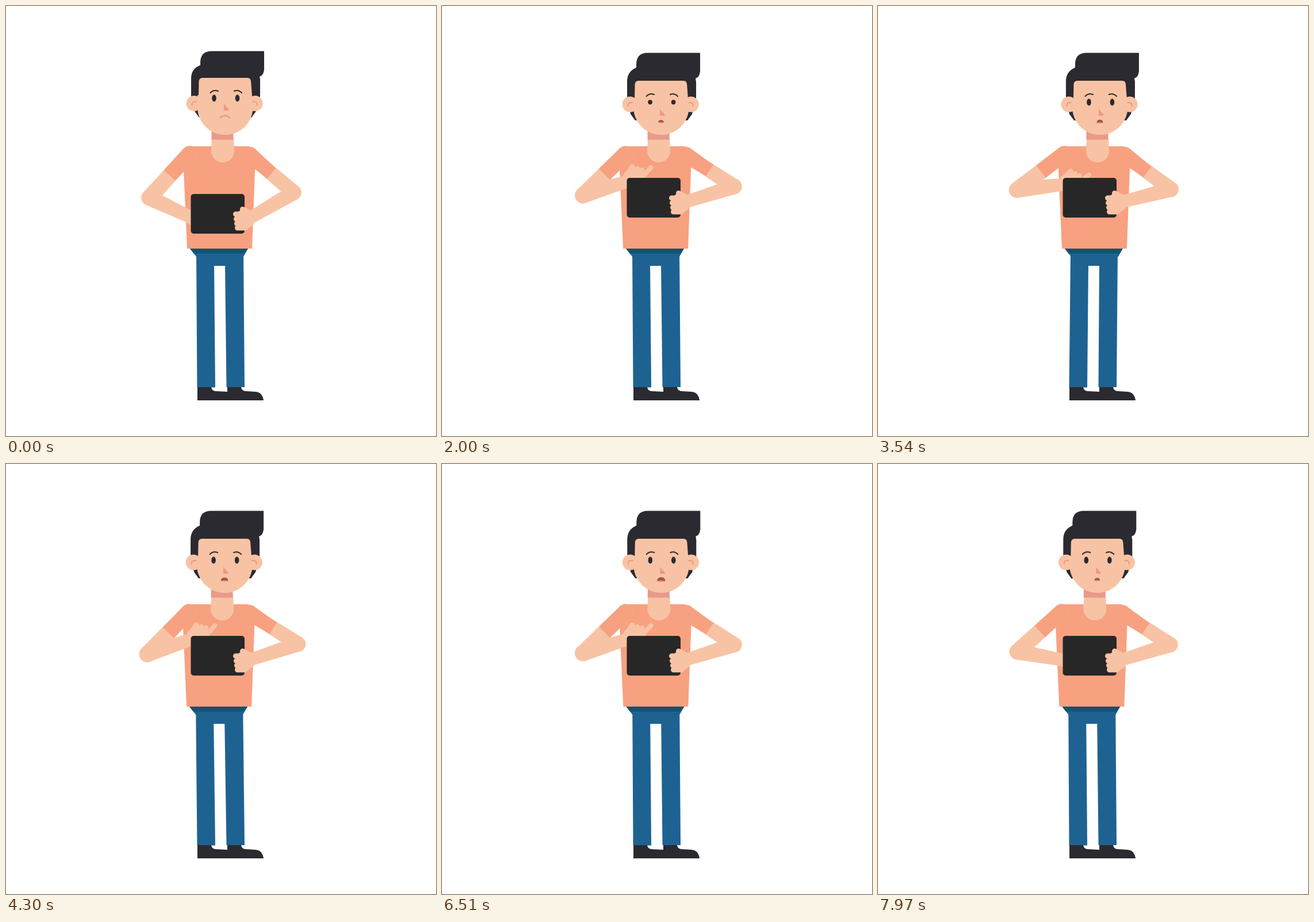
These frames come from a looping animation (748 by 748 pixels, 8 s). An HTML page with a canvas:

```html
<!DOCTYPE html>
<html lang="en">
<head>
<meta charset="utf-8">
<title>Man with tablet</title>
<style>
  html, body { margin: 0; width: 100%; height: 100%; overflow: hidden; background: #fff; }
  canvas { display: block; width: 100vmin; height: 100vmin; }
</style>
</head>
<body>
<canvas id="stage" width="748" height="748"></canvas>
<script>
const ctx = document.getElementById('stage').getContext('2d');
const LOOP = 8000;
const SKIN = '#f8c3a4', SHADE = '#e99a8a', SHIRT = '#f7a180', DARK = '#2b2a30';
const JEANS = '#1e6292', BELT = '#17526d', TABLET = '#272727';

const clamp = v => Math.max(0, Math.min(1, v));
const ease = (t, from, to) => {
  const p = clamp((t - from) / (to - from));
  return p * p * (3 - 2 * p);
};
const bump = (t, from, to) => Math.sin(Math.PI * clamp((t - from) / (to - from)));

function fill(color, d) {
  ctx.fillStyle = color;
  ctx.fill(new Path2D(d));
}

function stroke(color, width, d) {
  ctx.strokeStyle = color;
  ctx.lineWidth = width;
  ctx.lineCap = 'round';
  ctx.stroke(new Path2D(d));
}

function oval(color, x, y, rx, ry = rx) {
  ctx.fillStyle = color;
  ctx.beginPath();
  ctx.ellipse(x, y, rx, ry, 0, 0, Math.PI * 2);
  ctx.fill();
}

// Tapered limb from a to b with half widths ra and rb
function limb(color, a, b, ra, rb, roundEnd) {
  const len = Math.hypot(b.x - a.x, b.y - a.y);
  const nx = -(b.y - a.y) / len, ny = (b.x - a.x) / len;
  fill(color, `M${a.x + nx * ra} ${a.y + ny * ra}L${b.x + nx * rb} ${b.y + ny * rb}
    L${b.x - nx * rb} ${b.y - ny * rb}L${a.x - nx * ra} ${a.y - ny * ra}Z`);
  oval(color, a.x, a.y, ra);
  if (roundEnd) oval(color, b.x, b.y, rb);
}

// Two-bone joint position
function elbow(s, h, upper, lower, side) {
  const dx = h.x - s.x, dy = h.y - s.y, d = Math.hypot(dx, dy);
  const a = (upper * upper - lower * lower + d * d) / (2 * d);
  const b = side * Math.sqrt(Math.max(0, upper * upper - a * a));
  return { x: s.x + (a * dx - b * dy) / d, y: s.y + (a * dy + b * dx) / d };
}

function arm(s, h, o) {
  const e = elbow(s, h, o.upper, o.lower, o.side);
  const k = o.sleeve / o.upper;
  const cut = { x: s.x + (e.x - s.x) * k, y: s.y + (e.y - s.y) * k };
  limb(SKIN, s, e, o.width, o.joint, true);
  limb(SKIN, e, h, o.joint, 10.8, true);
  limb(SHIRT, s, cut, o.cap, o.width, false);
}

const LEFT = { upper: 103.4, lower: 84, side: 1, sleeve: 51, width: 13.5, joint: 14, cap: 13.5 };
const RIGHT = { upper: 100.6, lower: 87.4, side: -1, sleeve: 49.6, width: 11.7, joint: 13.3, cap: 14 };

function legs(dx) {
  const s = dx * 0.8;
  fill(JEANS, `M${331 + s} 432L${413 + s} 432L415 663L383.5 663L${381 + s} 452
    L${362 + s} 452L364 663.5L332.5 663.5Z`);
  fill(DARK, 'M333 663H357Q358 670 365 670L385 671V663H409Q410 670 417 670L434 671Q446 672 448 686H333Z');
}

function torso() {
  fill(JEANS, 'M320 422H421L413 436H331Z');
  fill(BELT, 'M320 422H421L414.5 430.5H326.5Z');
  fill(SHIRT, 'M318 244H422Q432 247 433.5 262L433 286L428 422H315L309 286L308 262Z');
}

function neck() {
  fill(SKIN, 'M358 230H396L397 252A20 20 0 0 1 357 252Z');
  fill(SHADE, 'M357.5 215H395.5V232.5H357.5Z');
}

function mouth(t, y) {
  if (t < 1400) {
    stroke(SHADE, 2.4, `M372 ${194.5 + y}Q380.5 ${187 + y} 389 ${194.5 + y}`);
    return;
  }
  const w = 6.6 - 1.7 * Math.cos((t - 2000) * 2 * Math.PI / 542.7);
  const h = w * 0.56, cy = 200.8;
  const shape = `M${381 - w} ${cy + h * .75}Q${381 - w} ${cy - h} 381 ${cy - h}
    Q${381 + w} ${cy - h} ${381 + w} ${cy + h * .75}Q381 ${cy + h * 1.15} ${381 - w} ${cy + h * .75}Z`;
  ctx.save();
  ctx.clip(new Path2D(shape));
  fill('#a5544a', shape);
  oval('#e5827a', 381, cy + h * 1.15, w * .85, h * .8);
  ctx.restore();
}

function head(t, k) {
  const y = 5 * k, top = 78.5 + 3 * k, ear = 169.5 + 1.6 * k, f = 7 * k;
  fill(DARK, `M322 ${157 + y}V${126 + y}Q322 ${109 + y} 338 ${103 + 4 * k}V${top + 20}
    Q338 ${top} 358 ${top}H449V${top + 32}Q448 ${121 + 3 * k} 441 ${123 + 3 * k}
    L442 ${127 + y}V${157 + y}L435 ${183 + y}L427 ${194 + y}H336L328 ${183 + y}Z`);
  fill(SKIN, `M335 ${155 + y}L335.5 ${131 + y}Q336 ${125 + y} 342 ${125 + y}H420
    Q425.5 ${125 + y} 426 ${131 + y}L428 ${157 + y}H429.5V178A48.3 48.3 0 0 1 333 178V${155 + y}Z`);
  oval(SKIN, 327, ear, 13.5);
  oval(SKIN, 433.2, ear, 13.5);
  stroke(SHADE, 2, `M323.5 ${ear + 3}Q323 ${ear - 4} 331 ${ear - 3}`);
  stroke(SHADE, 2, `M436.5 ${ear + 3}Q437 ${ear - 4} 429 ${ear - 3}`);

  const open = 1 - 0.8 * bump(t, 1930, 2230) ** 2;
  for (const x of [362, 402.5]) oval(DARK, x, 160.3 + f, 3.8, 0.6 + 5.5 * open);
  stroke(DARK, 2.1, `M355.5 ${151 + 6 * k}Q361 ${145 + 6 * k} 369 ${148 + 6 * k}`);
  stroke(DARK, 2.1, `M397 ${148 + 6 * k}Q404 ${145 + 6 * k} 410 ${151 + 6 * k}`);
  const n = 9 * k;
  fill('#ee978a', `M379 ${170 + n}L387.5 ${180 + n}Q388 ${182 + n} 386 ${182 + n}H379Z`);
  mouth(t, 7.5 * k);
}

// Pointing hand, drawn around its wrist
function pointingHand(h, angle) {
  ctx.save();
  ctx.translate(h.x, h.y);
  ctx.rotate(angle);
  ctx.translate(-325.3, -304);
  fill(SKIN, 'M313 303L316 292L329 279L344 283L354 291L352 310L325 316Z');
  stroke(SKIN, 9, 'M331 280L321 296M340 283.5L335 296');
  stroke(SKIN, 8, 'M348 285L343 298M363.5 281L347 299');
  ctx.restore();
}

function grip() {
  fill(SKIN, 'M403 331L412 323L430 331L431 352L418 361L403 361Z');
  stroke(SKIN, 9, 'M411.5 325.5L424 332M399.5 334H414M400.5 342.5H414M401.5 350.5H414M402.5 358H416');
}

function draw(t) {
  const dx = 2.75 - 3.7 * Math.cos((t - 240) * Math.PI / 1000);
  const lift = ease(t, 60, 880);
  const low = 28 * (1 - lift);
  const taps = Math.sin(Math.PI * clamp((t - 2300) / 1650) * 2) ** 2;
  const raise = (ease(t, 1130, 1930) - ease(t, 7050, 7950)) * (1 - 0.16 * taps);
  const hand = { x: 325.3, y: 304 + 37.5 * (1 - raise) + low };

  ctx.fillStyle = '#fff';
  ctx.fillRect(0, 0, 748, 748);
  legs(dx);

  ctx.save();
  ctx.translate(dx, 0);
  torso();
  neck();
  head(t, lift);
  ctx.restore();

  arm({ x: 319 + dx, y: 257 }, hand, LEFT);
  pointingHand(hand, (1 - raise) * Math.PI / 3);
  oval(SKIN, 338, 360.5, 10 * bump(t, 1060, 1280));

  arm({ x: 424 + dx, y: 259 }, { x: 425, y: 340.5 + low }, RIGHT);

  ctx.save();
  ctx.translate(0, low);
  ctx.fillStyle = TABLET;
  ctx.beginPath();
  ctx.roundRect(321.5, 299, 93.5, 69, 5);
  ctx.fill();
  grip();
  ctx.restore();
}

const start = performance.now();
function tick() {
  draw((performance.now() - start) % LOOP);
  requestAnimationFrame(tick);
}
tick();
</script>
</body>
</html>
```
